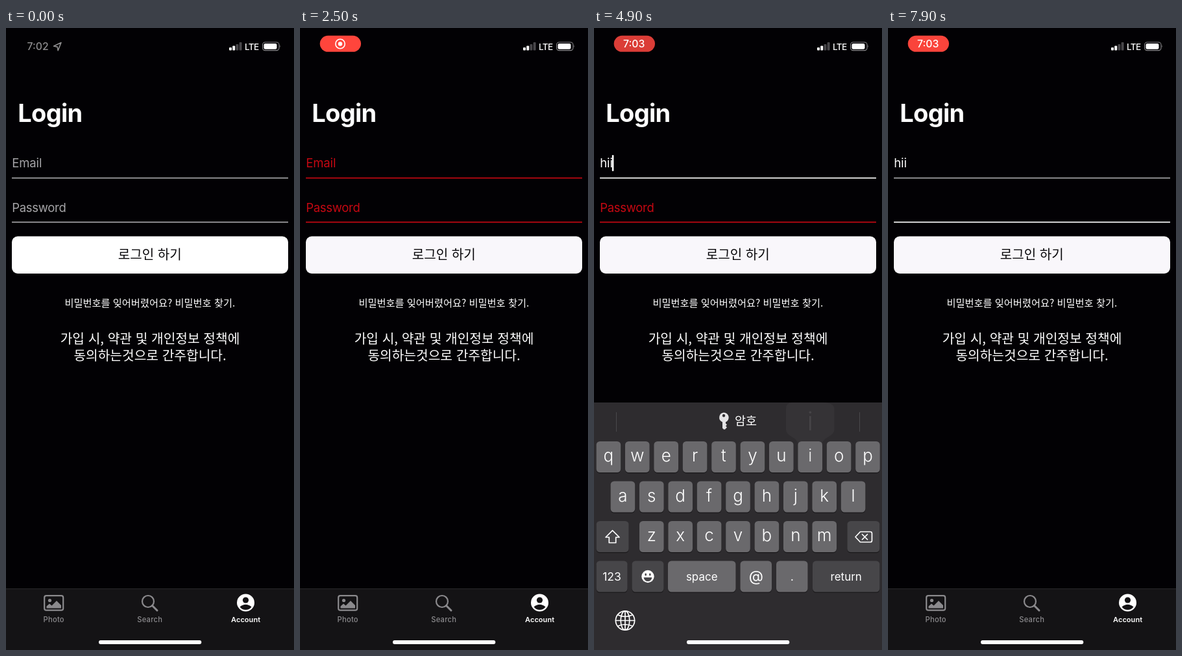
Recreate the animation shown at these times as an HTML page. Size 444x960 px, loop 8000 ms.

```html
<!DOCTYPE html>
<html lang="ko">
<head>
<meta charset="utf-8">
<title>Login</title>
<style>
html, body { margin: 0; width: 100%; height: 100%; overflow: hidden; background: #020104; }
svg { display: block; width: 444px; height: 960px; }
text { font-family: Inter, "Noto Sans CJK KR", "Noto Sans CJK JP", sans-serif; white-space: pre; }
.ko { font-family: "Noto Sans CJK KR", "Noto Sans CJK JP", "Noto Sans CJK", sans-serif; }
.mid { text-anchor: middle; }
</style>
</head>
<body>
<svg viewBox="0 0 444 960" xmlns="http://www.w3.org/2000/svg">
  <rect width="444" height="960" fill="#020104"/>

  <g id="form">
    <text x="18.3" y="145" font-size="38" font-weight="700" letter-spacing="-.7" fill="#fff">Login</text>
    <text id="email" x="9.2" y="215" font-size="18.5" letter-spacing="-.1">Email</text>
    <rect id="emailLine" x="9" y="230.7" width="426" height="1.7"/>
    <rect id="caret" y="196" width="2.6" height="25" rx="1.2" fill="#fff"/>
    <text id="pass" x="9.2" y="283.5" font-size="18.5" letter-spacing="-.3">Password</text>
    <rect id="passLine" x="9" y="298.8" width="426" height="1.7"/>
    <rect id="button" x="9" y="321.6" width="426" height="57.4" rx="9"/>
    <text class="ko mid" x="221.8" y="357.4" font-size="20.1" fill="#08070a">로그인 하기</text>
    <text class="ko mid" x="221.8" y="430" font-size="15.25" fill="#fff">비밀번호를 잊어버렸어요? 비밀번호 찾기.</text>
    <text class="ko mid" x="222" y="487" font-size="20.3" fill="#fff">가입 시, 약관 및 개인정보 정책에</text>
    <text class="ko mid" x="222" y="512.7" font-size="20.3" fill="#fff">동의하는것으로 간주합니다.</text>
  </g>

  <g id="tabs" font-size="11.2" font-weight="500" letter-spacing=".25">
    <rect y="865" width="444" height="95" fill="#141315"/>
    <rect y="865" width="444" height="1" fill="#29282b"/>
    <g fill="none" stroke="#8b8a8d" stroke-width="2.2">
      <rect x="59.2" y="876.2" width="29" height="22.5" rx="3"/>
      <circle cx="219" cy="885" r="9"/>
      <path d="M225.5 891.5L233 899" stroke-width="3" stroke-linecap="round"/>
    </g>
    <g fill="#8b8a8d">
      <circle cx="67.5" cy="883.5" r="2.6"/>
      <path d="M62.5 895.5v-3l4.5-4 3.5 3 7.5-7.5 7 7v4.5z"/>
      <text class="mid" x="73.7" y="917">Photo</text>
      <text class="mid" x="221.7" y="917">Search</text>
    </g>
    <circle cx="369.5" cy="887" r="13.5" fill="#fff"/>
    <circle cx="369.5" cy="883" r="4.6" fill="#141315"/>
    <path d="M360.5 893.5q9-7.5 18 0q-3.5 4.5-9 4.5t-9-4.5z" fill="#141315"/>
    <text class="mid" x="369.6" y="917" font-size="11" letter-spacing=".05" font-weight="600" fill="#fff">Account</text>
  </g>

  <rect id="dim" width="444" height="960"/>

  <g id="alert">
    <rect x="68" y="417" width="308" height="141" rx="15" fill="#211f22"/>
    <path id="press" d="M68 508h308v35a15 15 0 0 1-15 15H83a15 15 0 0 1-15-15z" fill="#3d3d43"/>
    <rect x="68" y="507" width="308" height="1" fill="#464549"/>
    <text class="ko mid" x="222" y="457.5" font-size="18.7" font-weight="700" fill="#fff">로그인 결과</text>
    <text class="ko mid" x="222" y="480" font-size="14.2" fill="#fff">입력한 값을 확인하세요.</text>
    <text class="ko mid" x="222" y="540" font-size="19" fill="#4683d2">확인</text>
  </g>

  <g id="keyboard"></g>

  <g id="clock">
    <text x="32.5" y="34" font-size="15.8" font-weight="500" fill="#8d8c8e">7:02</text>
    <path d="M85 22.5L73.5 28l5.7 1.1 1 5.7z" fill="none" stroke="#8d8c8e" stroke-width="1.6" stroke-linejoin="round"/>
  </g>
  <g id="pill">
    <rect id="pillBox" x="30.7" y="11.8" width="63.3" height="25" rx="12.5"/>
    <g id="rec">
      <circle cx="62" cy="24.5" r="7.2" fill="none" stroke="#fff" stroke-width="1.6"/>
      <circle cx="62" cy="24.5" r="3.2" fill="#fff"/>
    </g>
    <text id="time" class="mid" x="61.7" y="30" font-size="15.8" font-weight="500" fill="#fff">7:03</text>
  </g>
  <g fill="#fff">
    <rect x="344" y="30" width="4" height="4.5" rx="1"/>
    <rect x="349.2" y="27.5" width="4" height="7" rx="1"/>
    <rect x="354.4" y="25" width="4" height="9.5" rx="1" fill="#48474a"/>
    <rect x="359.6" y="22" width="4" height="12.5" rx="1" fill="#48474a"/>
    <text x="368" y="34" font-size="13.6" font-weight="500" letter-spacing="-.6">LTE</text>
    <rect x="395.6" y="22" width="25.4" height="12.6" rx="3.8" fill="none" stroke="#8b8a8d" stroke-width="1.1"/>
    <rect x="397.5" y="23.9" width="20" height="8.8" rx="2.2"/>
    <path d="M422.3 26.3q1.8 2 0 4.2z" fill="#8b8a8d"/>
    <rect x="143" y="945" width="158.3" height="5.9" rx="2.9"/>
  </g>
</svg>
<script>
const $ = id => document.getElementById(id);
const set = (id, name, value) => $(id).setAttribute(name, value);
const clamp = x => Math.min(1, Math.max(0, x));
const ramp = (t, start, length) => clamp((t - start) / length);
const smooth = x => x * x * (3 - 2 * x);
const rgb = c => `rgb(${c.map(Math.round)})`;
const mix = (a, b, k) => rgb(a.map((v, i) => v + (b[i] - v) * k));
// critically damped spring, 0 to 1
const spring = (t, start) => {
  const x = Math.max(0, t - start) * 0.0222;
  return 1 - Math.exp(-x) * (1 + x);
};

const LOOP = 8000, KB_TOP = 578, KB_HEIGHT = 382;
const GREY = [166, 165, 168], RED = [198, 8, 18], WHITE = [255, 255, 255];
const LIGHT = '#6a696c', DARK = '#474649', PANEL = '#2e2c2f';
const PRESSES = [['h', 4350], ['i', 4580], ['i', 4760]];
const CARET_X = [9, 20, 24, 27.8];
const keyX = {};

// keyboard is drawn relative to its own top edge
function key(x, y, w, label, size, fill = LIGHT, weight = 400) {
  return `<rect x="${x}" y="${y + 1.3}" width="${w}" height="48" rx="5.5" fill="#1a191b"/>
    <rect x="${x}" y="${y}" width="${w}" height="48" rx="5.5" fill="${fill}"/>
    <text class="mid" x="${x + w / 2}" y="${y + (size > 20 ? 31 : 30)}" font-size="${size}"
      font-weight="${weight}" fill="#fff">${label}</text>`;
}

function letters(row, x, y) {
  return [...row].map((c, i) => {
    keyX[c] = x + i * 44.4;
    return key(keyX[c], y, 37.6, c, 26, LIGHT, 300);
  }).join('');
}

function popup([c], i) {
  const x = keyX[c], top = c === 'h' ? 61.5 : 0;
  return `<g id="pop${i}"><path fill="${LIGHT}" d="M${x - 9} ${top}h47q18 0 18 10v32q0 6-9 11t-9.4 10v34
    q0 6-6 6h-26q-6 0-6-6v-34q0-5-9-10t-9-11v-32q0-10 9.4-10z"/>
    <text class="mid" x="${x + 18.8}" y="${top + 43}" font-size="39" font-weight="300" fill="#fff">${c}</text></g>`;
}

$('keyboard').innerHTML = `
  <rect width="444" height="${KB_HEIGHT + 20}" fill="${PANEL}"/>
  <path d="M34.5 15v30M409.5 15v30" stroke="#49484b"/>
  <path fill="#e4e3e5" fill-rule="evenodd" d="M200 15.5a7.7 7.7 0 0 1 3 14.8v2l2 2-2 2 2 2-3 3.2h-2l-2-2v-9.2a7.7 7.7 0 0 1 2-14.8zm0 2.6a2.2 2.2 0 1 0 .1 0z"/>
  <text class="ko" x="217" y="35" font-size="18.5" fill="#fff">암호</text>
  ${letters('qwertyuiop', 3.6, 60)}
  ${letters('asdfghjkl', 25.6, 121.5)}
  ${letters('zxcvbnm', 70, 183)}
  ${key(3.6, 183, 50, '', 18, DARK)}
  ${key(390.4, 183, 50, '', 18, DARK)}
  ${key(3.6, 244.5, 48, '123', 17.6, DARK)}
  ${key(58.5, 244.5, 49, '', 18, DARK)}
  ${key(114, 244.5, 104.5, 'space', 17)}
  ${key(225.5, 244.5, 48.5, '@', 23)}
  ${key(281, 244.5, 48.5, '.', 18)}
  ${key(337, 244.5, 103.5, 'return', 17, DARK)}
  <g fill="none" stroke="#fff" stroke-width="1.7" stroke-linejoin="round" stroke-linecap="round">
    <path d="M28.5 197.5l-10.5 10.5h5.3v8.5h10.4v-8.5h5.3z"/>
    <path d="M403 207.5l7.5-8h15.5q2.5 0 2.5 2.5v11q0 2.5-2.5 2.5h-15.5zM413.5 203.5l8 8m0-8l-8 8"/>
    <circle cx="48" cy="336.5" r="14.6"/>
    <ellipse cx="48" cy="336.5" rx="6.8" ry="14.6"/>
    <path d="M48 322v29M33.5 336.5h29M37 328q11 5 22 0M37 345q11-5 22 0"/>
  </g>
  <circle cx="83" cy="268.5" r="9.7" fill="#fff"/>
  <g fill="${DARK}">
    <ellipse cx="79.7" cy="265.5" rx="1.3" ry="2"/>
    <ellipse cx="86.3" cy="265.5" rx="1.3" ry="2"/>
    <path d="M76.5 270h13q-1.5 6-6.5 6t-6.5-6z"/>
  </g>
  ${PRESSES.map(popup).join('')}`;

function drawStatus(t) {
  const wave = (1 - Math.cos((t - 4150) / 1700 * 2 * Math.PI)) / 2;
  const toTime = smooth(ramp(t, 2700, 250));
  set('clock', 'opacity', 1 - ramp(t, 50, 200));
  set('pill', 'opacity', smooth(ramp(t, 50, 380)));
  set('pillBox', 'fill', mix([255, 69, 60], [216, 60, 55], wave * wave));
  set('rec', 'opacity', ramp(t, 250, 350) * (1 - toTime));
  set('time', 'opacity', toTime);
}

function drawForm(t) {
  const invalid = ramp(t, 1000, 100);
  const onEmail = t >= 3650 && t < 5300, onPass = t >= 5300;
  const typed = PRESSES.filter(p => t >= p[1]).length;
  const idle = mix(GREY, RED, invalid), grey = rgb(GREY), white = rgb(WHITE);
  $('email').textContent = typed ? 'hii'.slice(0, typed) : 'Email';
  set('email', 'fill', typed ? white : onEmail ? grey : idle);
  set('emailLine', 'fill', onEmail ? white : onPass ? grey : idle);
  set('pass', 'fill', onPass ? grey : idle);
  set('passLine', 'fill', onPass ? white : idle);
  set('pass', 'opacity', t < 6800 ? 1 : 0);
  set('caret', 'x', CARET_X[typed]);
  set('caret', 'opacity', onEmail ? 1 : 0);
  set('button', 'fill', mix(WHITE, [249, 247, 251], invalid));
}

function drawAlert(t) {
  const show = smooth(ramp(t, 1100, 300));
  const alpha = show * (1 - smooth(ramp(t, 2250, 250)));
  set('dim', 'opacity', 0.42 * alpha);
  set('alert', 'opacity', alpha);
  set('alert', 'transform', `translate(222 487.5) scale(${1.2 - 0.2 * show}) translate(-222 -487.5)`);
  set('press', 'opacity', t >= 2050 ? 1 : 0);
}

function drawKeyboard(t) {
  const up = spring(t, 3600) - spring(t, 5300);
  set('keyboard', 'transform', `translate(0 ${KB_TOP + KB_HEIGHT * (1 - up)})`);
  set('keyboard', 'visibility', up > 0.001 ? 'visible' : 'hidden');
  PRESSES.forEach(([, at], i) => {
    set('pop' + i, 'opacity', t < at ? 0 : 1 - ramp(t, at + 70, 80));
  });
}

function tick() {
  const t = performance.now() % LOOP;
  drawStatus(t);
  drawForm(t);
  drawAlert(t);
  drawKeyboard(t);
  requestAnimationFrame(tick);
}
tick();
</script>
</body>
</html>
```
